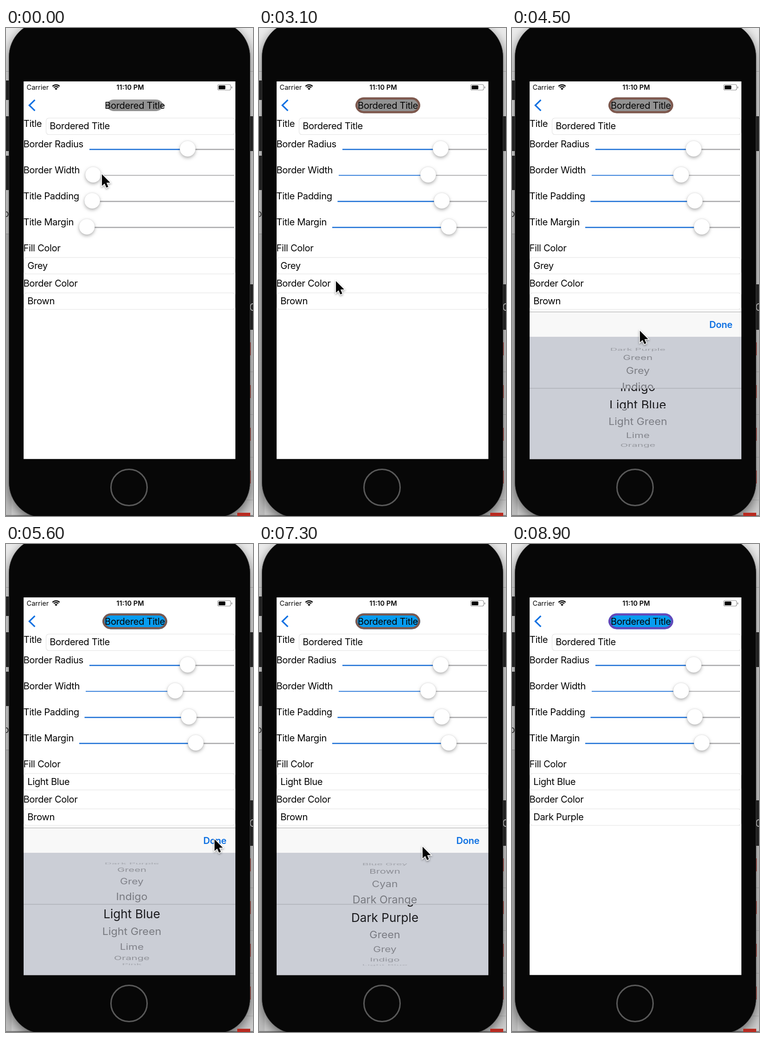
Animation, 533 px wide and 1051 px high, one loop 9000 ms. Source, as an HTML page with a canvas:

```html
<!DOCTYPE html>
<html lang="en">
<head>
<meta charset="utf-8">
<title>Bordered Title</title>
<style>
  html, body { margin: 0; width: 100%; height: 100%; overflow: hidden; background: #c6c6c6; }
  canvas { display: block; width: 533px; height: 1051px; }
</style>
</head>
<body>
<canvas id="stage"></canvas>
<script>
const W = 533, H = 1051, LOOP = 9000, STEP = 100;
const canvas = document.getElementById('stage');
const c = canvas.getContext('2d');
const dpr = window.devicePixelRatio || 1;
canvas.width = W * dpr;
canvas.height = H * dpr;

const BLUE = '#0d70e2', TRACK = '#a9a9ab';
const SCREEN = { x: 38, y: 115, w: 457, h: 813.5 };
const COLORS = ['Amber', 'Blue', 'Blue Grey', 'Brown', 'Cyan', 'Dark Orange', 'Dark Purple',
  'Green', 'Grey', 'Indigo', 'Light Blue', 'Light Green', 'Lime', 'Orange', 'Pink', 'Purple', 'Red'];

// Rows are [time, value, ...]; smooth motion between them.
const CURSOR = [
  [0, 207, 315], [100, 207, 315], [800, 384, 317], [1100, 208, 362], [1200, 208, 361],
  [1500, 330, 360], [1750, 417, 361], [2000, 196, 416], [2100, 196, 416], [2700, 431, 418],
  [3100, 166, 545], [3500, 150, 521], [4000, 150, 521], [4200, 274, 735], [4500, 276, 652],
  [5100, 276, 652], [5450, 450, 636], [5700, 450, 636], [6300, 157, 588], [6550, 157, 588],
  [6900, 350, 770], [7300, 353, 652], [7650, 353, 652], [8000, 450, 636], [8250, 450, 636], [8700, 570, 700]
];
const WIDTH_DRAG = [[100, 0], [800, 1]];
const PADDING_DRAG = [[1200, 0], [1500, 0.58], [1750, 1]];
const MARGIN_DRAG = [[2100, 0], [2700, 1]];
const PICKER = [[3800, 0], [4150, 1], [5600, 1], [5950, 0], [6400, 0], [6750, 1], [8150, 1], [8500, 0]];
const WHEEL = [[4200, 8], [4500, 9.63], [5000, 10], [6000, 10], [6001, 3], [6900, 3], [7300, 5.815], [7550, 6]];

function at(rows, t, ease = k => k * k * (3 - 2 * k)) {
  if (t <= rows[0][0]) return rows[0].slice(1);
  for (let i = 1; i < rows.length; i++) {
    const a = rows[i - 1], b = rows[i];
    if (t <= b[0]) {
      const k = ease((t - a[0]) / (b[0] - a[0]));
      return a.slice(1).map((v, j) => v + (b[j + 1] - v) * k);
    }
  }
  return rows[rows.length - 1].slice(1);
}

function rect(x, y, w, h, color) {
  c.fillStyle = color;
  c.fillRect(x, y, w, h);
}

function text(str, x, y, o = {}) {
  const { size = 20.2, weight = 400, color = '#050505', align = 'left', spacing = -0.37 } = o;
  c.font = `${weight} ${size}px Inter, sans-serif`;
  c.letterSpacing = spacing + 'px';
  c.textAlign = align;
  c.fillStyle = color;
  c.fillText(str, x, y);
}

function line(points, color, width) {
  c.beginPath();
  points.forEach(p => c.lineTo(...p));
  c.strokeStyle = color;
  c.lineWidth = width;
  c.stroke();
}

function clipped(x, y, w, h, draw) {
  c.save();
  c.beginPath();
  c.rect(x, y, w, h);
  c.clip();
  draw();
  c.restore();
}

function desktop() {
  const g = c.createLinearGradient(0, 0, 0, H);
  g.addColorStop(0, '#ececec');
  g.addColorStop(0.3, '#dedede');
  g.addColorStop(1, '#cecece');
  rect(0, 0, W, H, g);
  rect(0, 93, W, 1, '#b9b9b9');
  rect(0, 113, 12, 42, '#2c2c2c');
  rect(0, 190, W, 75, '#2c2c2c');
  rect(0, 275, 12, 74, '#2c2c2c');
  text('o', -6, 407, { size: 21, color: '#333' });
  rect(0, 443, 12, 1, '#a2a2a2');
  rect(0, 444, 12, 607, 'rgba(0,0,0,.08)');
  rect(520, 552, 13, 98, '#2c2c2c');
  text('0', 525, 609, { size: 22, color: '#d8d8d8' });
  for (let y = 740; y < H; y += 92) {
    rect(515, y, 18, 1, '#b4b4b4');
    rect(500, y - 63, 28, 28, '#c4281f');
  }
  rect(0, 1049, W, 2, '#7c7c7c');
}

function phone() {
  c.save();
  c.shadowColor = 'rgba(0,0,0,.55)';
  c.shadowBlur = 24 * dpr;
  c.shadowOffsetY = 8 * dpr;
  c.beginPath();
  c.roundRect(6.5, -14, 520, 1069, 76);
  c.fillStyle = '#070707';
  c.fill();
  c.restore();
  c.strokeStyle = '#3b3b3b';
  c.lineWidth = 1;
  c.stroke();
  rect(499, 1044, 28, 7, '#b92a20');
  c.beginPath();
  c.arc(265.5, 989.5, 39, 0, 7);
  c.strokeStyle = '#595959';
  c.lineWidth = 3;
  c.stroke();
}

function statusBar() {
  text('Carrier', 44.5, 133, { size: 14.6, spacing: 0 });
  text('11:10 PM', 268, 133, { size: 14.6, weight: 600, align: 'center', spacing: 0 });
  const up = -Math.PI / 2, half = 0.8;
  [10.6, 6.8].forEach(r => {
    c.beginPath();
    c.arc(108, 133, r, up - half, up + half);
    c.strokeStyle = '#050505';
    c.lineWidth = 2.3;
    c.stroke();
  });
  c.beginPath();
  c.moveTo(108, 133.5);
  c.arc(108, 133.5, 4.3, up - half, up + half);
  c.fillStyle = '#050505';
  c.fill();
  c.beginPath();
  c.roundRect(456.8, 121.8, 28, 12, 3);
  c.strokeStyle = '#8d8d8d';
  c.lineWidth = 1.1;
  c.stroke();
  c.beginPath();
  c.roundRect(458.8, 123.7, 14.5, 8.2, 1.5);
  c.fill();
  rect(486.5, 126, 1.6, 4, '#8d8d8d');
}

// Corner arcs may be larger than half the height, which makes the ends pointed.
function pillPath(cx, cy, hw, hh, r) {
  const a = Math.acos(Math.min(1, Math.max(0, r - hh) / r));
  const q = Math.PI / 2, d = Math.max(0, r - hh);
  const reach = d > 0 ? a : q;
  const top = cy - hh + r, bottom = cy + hh - r;
  c.beginPath();
  c.arc(cx - hw + r, top, r, -q - reach, -q);
  c.arc(cx + hw - r, top, r, -q, -q + reach);
  c.arc(cx + hw - r, bottom, r, q - reach, q);
  c.arc(cx - hw + r, bottom, r, q, q + reach);
  c.closePath();
}

function navTitle(border, padding, fill, edge) {
  const bw = 4.5 * border;
  const hw = 63 + 7 * padding, hh = 12.5 + 0.9 * border + 3.6 * padding;
  pillPath(278, 166.5, hw, hh, 18);
  c.fillStyle = fill;
  c.fill();
  text('Bordered Title', 278, 173.6, { align: 'center' });
  if (bw > 0) {
    c.save();
    pillPath(278, 166.5, hw, hh, 18);
    c.clip();
    c.strokeStyle = edge;
    c.lineWidth = bw * 2;
    c.stroke();
    c.restore();
  }
}

function field(x, y, w, value, baseline) {
  c.beginPath();
  c.roundRect(x, y, w, 35.5, 6);
  c.strokeStyle = '#e2e2e2';
  c.lineWidth = 1.1;
  c.stroke();
  text(value, x + 7.7, baseline);
}

function slider(label, y, start, knob, thick = 2.5) {
  text(label, 37.5, y - 3);
  const ty = y + 1.4;
  line([[knob, ty], [492.5, ty]], TRACK, thick);
  line([[start, ty], [knob, ty]], '#1b6fd6', thick);
  c.save();
  c.shadowColor = 'rgba(0,0,0,.3)';
  c.shadowBlur = 7 * dpr;
  c.shadowOffsetY = 3 * dpr;
  c.beginPath();
  c.arc(knob, y, 17, 0, 7);
  c.fillStyle = '#fff';
  c.fill();
  c.restore();
  c.strokeStyle = 'rgba(0,0,0,.1)';
  c.lineWidth = 0.7;
  c.stroke();
}

function wheel(pos) {
  const mid = 797, bandTop = 776, bandEnd = 819, radius = 110.5, turn = 19.8 * Math.PI / 180;
  const grey = () => COLORS.forEach((name, i) => {
    const angle = (i - pos) * turn;
    if (Math.abs(angle) > 1.45) return;
    const cos = Math.cos(angle);
    c.save();
    c.translate(271.5, mid + radius * Math.sin(angle));
    c.scale(1 - 0.12 * (1 - cos), cos);
    text(name, 0, 8.4, { size: 23.4, spacing: 0, align: 'center', color: `rgba(25,25,30,${0.48 * Math.sqrt(cos)})` });
    c.restore();
  });
  clipped(38, 665, 457, bandTop - 665, grey);
  clipped(38, bandEnd, 457, 928.5 - bandEnd, grey);
  clipped(38, bandTop, 457, bandEnd - bandTop, () => COLORS.forEach((name, i) => {
    const y = mid + (i - pos) * 39;
    if (Math.abs(y - mid) < 60)
      text(name, 271.5, y + 9.4, { size: 26.1, spacing: 0, align: 'center', color: '#1b1b1e' });
  }));
  rect(38, bandTop - 0.5, 457, 1, '#a1a4aa');
}

function picker(open, pos) {
  if (open <= 0) return;
  c.save();
  c.translate(0, (1 - open) * 317.5);
  rect(38, 611, 457, 54, '#f8f8f8');
  if (open === 1) rect(38, 611, 457, 1, '#a6a6a6');
  text('Done', 475.5, 645.5, { weight: 600, color: BLUE, align: 'right' });
  rect(38, 665, 457, 264, '#cbced6');
  wheel(pos);
  c.restore();
}

function pointer(x, y) {
  c.save();
  c.translate(x, y);
  c.beginPath();
  [[0, 0], [0, 25], [5.7, 19.9], [9.6, 28.8], [13.7, 27], [9.9, 18.3], [17.8, 18]].forEach(p => c.lineTo(...p));
  c.closePath();
  c.shadowColor = 'rgba(0,0,0,.4)';
  c.shadowBlur = 4 * dpr;
  c.shadowOffsetY = 2 * dpr;
  c.strokeStyle = '#fff';
  c.lineWidth = 3;
  c.stroke();
  c.shadowColor = 'transparent';
  c.fillStyle = '#050505';
  c.fill();
  c.restore();
}

function draw(t) {
  const [border] = at(WIDTH_DRAG, t);
  const [padding] = at(PADDING_DRAG, t, k => k);
  const [margin] = at(MARGIN_DRAG, t);
  const [open] = at(PICKER, t);
  const [pos] = at(WHEEL, t, k => k * (2 - k));
  const filled = t >= 5100, edged = t >= 7600;

  c.setTransform(dpr, 0, 0, dpr, 0, 0);
  desktop();
  phone();
  clipped(SCREEN.x, SCREEN.y, SCREEN.w, SCREEN.h, () => {
    rect(SCREEN.x, SCREEN.y, SCREEN.w, SCREEN.h, '#fff');
    statusBar();
    line([[62.3, 154.8], [50.3, 166.5], [62.3, 178.2]], BLUE, 3.2);
    navTitle(border, padding, filled ? '#079cf0' : '#929292', edged ? '#6747b9' : '#7e584d');
    text('Title', 37.8, 213);
    field(86.5, 194, 408, 'Bordered Title', 218);
    slider('Border Radius', 260, 180, 392);
    slider('Border Width', 316, 172, 188 + 177 * border, 1.8);
    slider('Title Padding', 372, 169.5, 186 + 208.5 * padding);
    slider('Title Margin', 428, 158, 174.5 + 235 * margin);
    text('Fill Color', 37.5, 481);
    field(38.5, 494.3, 456, filled ? 'Light Blue' : 'Grey', 518.5);
    text('Border Color', 37.5, 557);
    field(38.5, 570.5, 456, edged ? 'Dark Purple' : 'Brown', 595);
    picker(open, pos);
  });
  pointer(...at(CURSOR, t));
}

const begin = performance.now();
let shown = -1;
function tick() {
  const t = Math.floor(((performance.now() - begin) % LOOP) / STEP) * STEP;
  if (t !== shown) draw(shown = t);
  requestAnimationFrame(tick);
}
tick();
</script>
</body>
</html>
```
